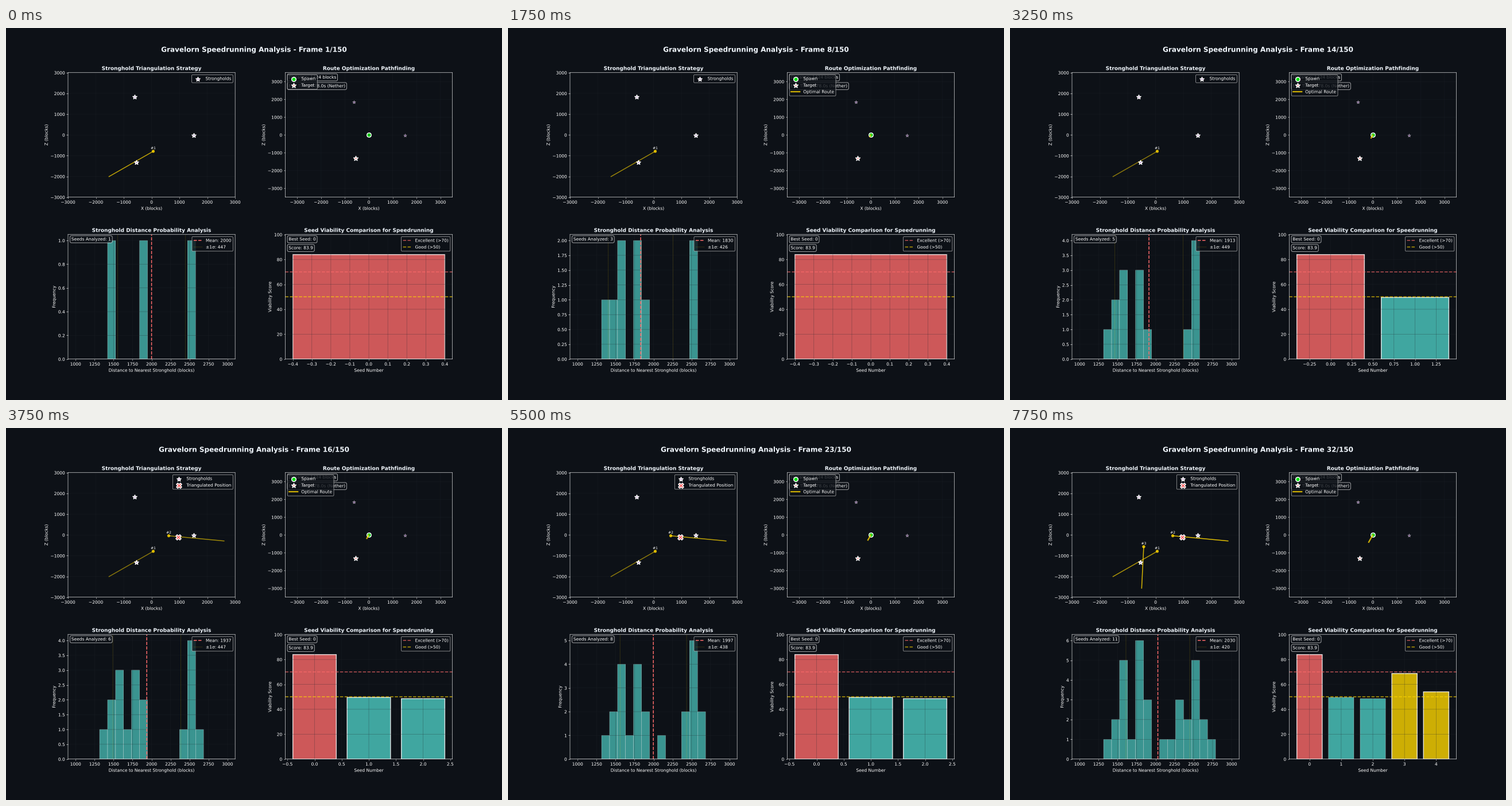
A matplotlib script that plays this animation: 864 by 648 pixels, repeating every 8000 ms.

```python
import numpy as np
import matplotlib.pyplot as plt
from matplotlib import patheffects
from matplotlib.animation import FuncAnimation

BG, FG = "#0d1117", "#f0f6fc"
RED, TEAL, GOLD, PURPLE, GREEN = "#ff6b6b", "#4ecdc4", "#ffd700", "#9b59b6", "#00e010"
FRAMES, TOTAL = 32, 150

plt.rcParams.update({
    "font.family": "DejaVu Sans", "font.size": 10,
    "figure.facecolor": BG, "axes.facecolor": BG, "text.color": "white",
    "axes.edgecolor": "white", "axes.labelcolor": "white",
    "xtick.color": "white", "ytick.color": "white",
    "grid.color": "#21262d", "legend.edgecolor": "0.8",
    # smooth sub-pixel text and lines instead of hinted, snapped ones
    "text.hinting": "no_hinting", "path.snap": False,
    "path.effects": [patheffects.Normal()],
})

STRONGHOLDS = np.array([(-553, -1315), (1509, -14), (-617, 1840)])
TARGET = STRONGHOLDS[0]
# throw position and angle of flight
THROWS = [((60, -790), np.pi + 0.654), ((617, -42), -0.125), ((-425, -568), -1.608)]
FIX = (965, -97)

# histogram bin of the three strongholds of each seed
EDGES = np.linspace(1000, 3000, 20)
SEED_BINS = [(4, 8, 14), (3, 5, 7), (5, 7, 14), (5, 13, 14), (4, 7, 14), (6, 8, 15),
             (5, 10, 14), (7, 13, 15), (7, 12, 12), (5, 12, 16), (7, 8, 11)]
MEANS = [2000, 1770, 1830, 1911, 1913, 1937, 1956, 1997, 2014, 2034, 2030]
SIGMAS = [447, 410, 426, 455, 449, 447, 444, 438, 425, 428, 420]
SCORES = [83.9, 49.5, 48.5, 68.7, 54.0]

fig, axes = plt.subplots(2, 2, figsize=(16, 12), dpi=54)
fig.subplots_adjust(wspace=0.3, hspace=0.3)
heading = fig.suptitle("", y=0.95, fontsize=16, fontweight="bold", color=FG)


def begin(ax, title, xlabel, ylabel):
    ax.clear()
    ax.set_title(title, fontsize=12, fontweight="bold", color=FG)
    ax.set_xlabel(xlabel)
    ax.set_ylabel(ylabel)
    ax.grid(True, alpha=0.45)


def note(ax, row, text):
    ax.text(0.02, 0.98 - 0.07 * row, text, transform=ax.transAxes, va="top",
            bbox=dict(boxstyle="round,pad=0.3", facecolor=BG, edgecolor="white", alpha=0.8))


def square_limits(ax, limit):
    ax.set_xlim(-limit, limit)
    ax.set_ylim(-limit, limit)


def draw_triangulation(ax, i):
    begin(ax, "Stronghold Triangulation Strategy", "X (blocks)", "Z (blocks)")
    square_limits(ax, 3000)
    ax.scatter(*STRONGHOLDS.T, s=100, marker="*", c=PURPLE, edgecolors="white",
               linewidths=2, zorder=5, label="Strongholds")
    count = i // 15 + 1
    for k, ((x, z), angle) in enumerate(THROWS[:count]):
        alpha = 0.7 + 0.2 * np.sin(0.1 * i + 3 + 1.3 * k)
        ax.plot([x, x + 2000 * np.cos(angle)], [z, z + 2000 * np.sin(angle)],
                color=GOLD, lw=2, alpha=alpha)
        ax.plot(x, z, "o", color=GOLD, ms=6, alpha=0.8)
        ax.annotate(f"#{k + 1}", (x, z), xytext=(0, 5), textcoords="offset points",
                    ha="center", fontsize=8)
    if count >= 2:
        ax.scatter(*FIX, s=150, marker="X", c=RED, edgecolors="white",
                   linewidths=2, zorder=6, label="Triangulated Position")
    ax.legend(loc="upper right")


def draw_route(ax, i):
    begin(ax, "Route Optimization Pathfinding", "X (blocks)", "Z (blocks)")
    square_limits(ax, 3500)
    ax.scatter(0, 0, s=100, c=GREEN, edgecolors="white", linewidths=2, label="Spawn")
    ax.scatter(*TARGET, s=120, marker="*", c=RED, edgecolors="white",
               linewidths=2, label="Target")
    ax.scatter(*STRONGHOLDS[1:].T, s=60, marker="*", c=PURPLE, edgecolors="white",
               linewidths=0.8, alpha=0.7)
    if i > 0:
        end = TARGET * i / 100
        ax.plot([0, end[0]], [0, end[1]], color=GOLD, lw=3, alpha=0.8, label="Optimal Route")
    note(ax, 0, "Distance: 1424 blocks")
    note(ax, 1, "Est. Time: 178.0s (Nether)")
    ax.legend(loc="upper left")


def draw_distances(ax, i):
    begin(ax, "Stronghold Distance Probability Analysis",
          "Distance to Nearest Stronghold (blocks)", "Frequency")
    seeds = i // 3 + 1
    bins = np.ravel(SEED_BINS[:seeds])
    ax.hist((EDGES[bins] + EDGES[bins + 1]) / 2, bins=EDGES, color=TEAL, alpha=0.7,
            edgecolor="white", linewidth=0.5)
    mean, sigma = MEANS[seeds - 1], SIGMAS[seeds - 1]
    ax.axvline(mean, color=RED, ls="--", lw=2, label=f"Mean: {mean}")
    ax.axvline(mean - sigma, color=GOLD, ls=":", lw=1, alpha=0.5, label=f"±1σ: {sigma}")
    ax.axvline(mean + sigma, color=GOLD, ls=":", lw=1, alpha=0.5)
    ax.set_xlim(900, 3100)
    note(ax, 0, f"Seeds Analyzed: {seeds}")
    ax.legend(loc="upper right")


def draw_scores(ax, i):
    begin(ax, "Seed Viability Comparison for Speedrunning", "Seed Number", "Viability Score")
    scores = SCORES[:i * 20 // TOTAL + 1]
    colors = [RED if s > 70 else GOLD if s > 50 else TEAL for s in scores]
    bars = ax.bar(range(len(scores)), scores, color=colors, alpha=0.8,
                  edgecolor="white", linewidth=0.5)
    # the three best seeds get a heavy outline
    for k in np.argsort(scores)[-3:]:
        bars[k].set_linewidth(2)
    ax.axhline(70, color=RED, ls="--", lw=2, alpha=0.7, label="Excellent (>70)")
    ax.axhline(50, color=GOLD, ls="--", lw=2, alpha=0.7, label="Good (>50)")
    ax.set_ylim(0, 100)
    note(ax, 0, "Best Seed: 0")
    note(ax, 1, f"Score: {max(scores)}")
    ax.legend(loc="upper right")


def update(i):
    heading.set_text(f"Gravelorn Speedrunning Analysis - Frame {i + 1}/{TOTAL}")
    draw_triangulation(axes[0, 0], i)
    draw_route(axes[0, 1], i)
    draw_distances(axes[1, 0], i)
    draw_scores(axes[1, 1], i)
    return []


anim = FuncAnimation(fig, update, frames=FRAMES, interval=250, repeat=True, repeat_delay=0)
plt.show()
```
